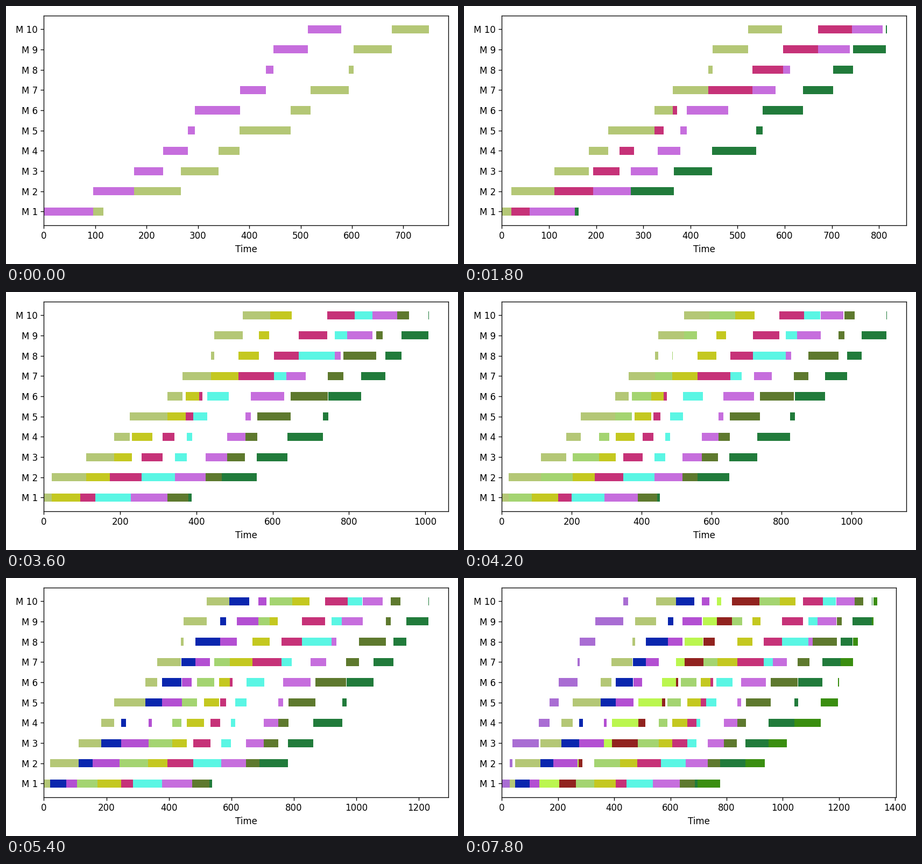
Recreate the animation shown at these times as a matplotlib script. Size 840 px wide and 480 px high, loop 8000 ms.

```python
import matplotlib.pyplot as plt
import numpy as np
from matplotlib.animation import FuncAnimation

MACHINES = 10
STEP_MS = 200

# Colour and processing time on each machine, in the order the jobs are added.
JOBS = {
    "A": ("#b4c776", [20, 91, 73, 41, 99, 39, 75, 9, 75, 72]),
    "B": ("#c66edd", [96, 80, 56, 48, 14, 88, 50, 15, 67, 65]),
    "D": ("#217b3b", [8, 91, 81, 93, 14, 86, 64, 42, 70, 2]),
    "C": ("#c63278", [39, 83, 55, 31, 19, 9, 93, 65, 75, 72]),
    "F": ("#5e792e", [55, 43, 47, 32, 87, 97, 41, 86, 17, 30]),
    "E": ("#c4c820", [76, 62, 47, 54, 48, 35, 72, 54, 27, 56]),
    "H": ("#5af6e4", [93, 88, 31, 14, 37, 57, 33, 95, 32, 46]),
    "G": ("#a4d471", [65, 92, 75, 30, 48, 56, 50, 1, 36, 73]),
    "J": ("#b34fd2", [34, 86, 88, 9, 64, 31, 47, 52, 69, 26]),
    "I": ("#0a26ae", [52, 45, 64, 14, 54, 62, 45, 80, 19, 64]),
    "K": ("#bbf64f", [72, 4, 29, 94, 85, 50, 29, 66, 50, 16]),
    "L": ("#91231f", [59, 13, 92, 25, 10, 7, 67, 41, 54, 97]),
    "N": ("#3a8e10", [82, 69, 65, 93, 61, 4, 44, 17, 6, 13]),
    "M": ("#a96dd3", [27, 11, 94, 38, 32, 67, 8, 56, 99, 17]),
}
ADDED = list(JOBS)
SEQUENCE = "MAIJKLGECHBFDN"

plt.rcParams["font.family"] = "DejaVu Sans"
fig, ax = plt.subplots(figsize=(7, 4), dpi=120)
rows = np.arange(1, MACHINES + 1)


def job_count(frame):
    """Two jobs for the first 1200 ms, then one more every 600 ms."""
    return 2 if frame < 6 else 3 + (frame - 6) // 3


def job_order(count):
    if count == 2:
        return "BA"
    return [job for job in SEQUENCE if job in ADDED[:count]]


def schedule(order):
    """Yield each job with its start times in a permutation flow shop."""
    free = [0] * MACHINES
    for job in order:
        starts, ready = [], 0
        for m, time in enumerate(JOBS[job][1]):
            start = max(ready, free[m])
            ready = free[m] = start + time
            starts.append(start)
        yield job, starts, ready


def draw(frame):
    ax.clear()
    for job, starts, end in schedule(job_order(job_count(frame))):
        color, times = JOBS[job]
        ax.barh(rows, times, left=starts, height=0.4, color=color)
    ax.set_xlim(0, end * 1.05)
    ax.set_yticks(rows, [f"M {m}" for m in rows])
    ax.set_xlabel("Time")
    fig.tight_layout()
    return []


anim = FuncAnimation(fig, draw, frames=40, interval=STEP_MS,
                     init_func=lambda: draw(0), repeat=True, repeat_delay=0)
plt.show()
```
